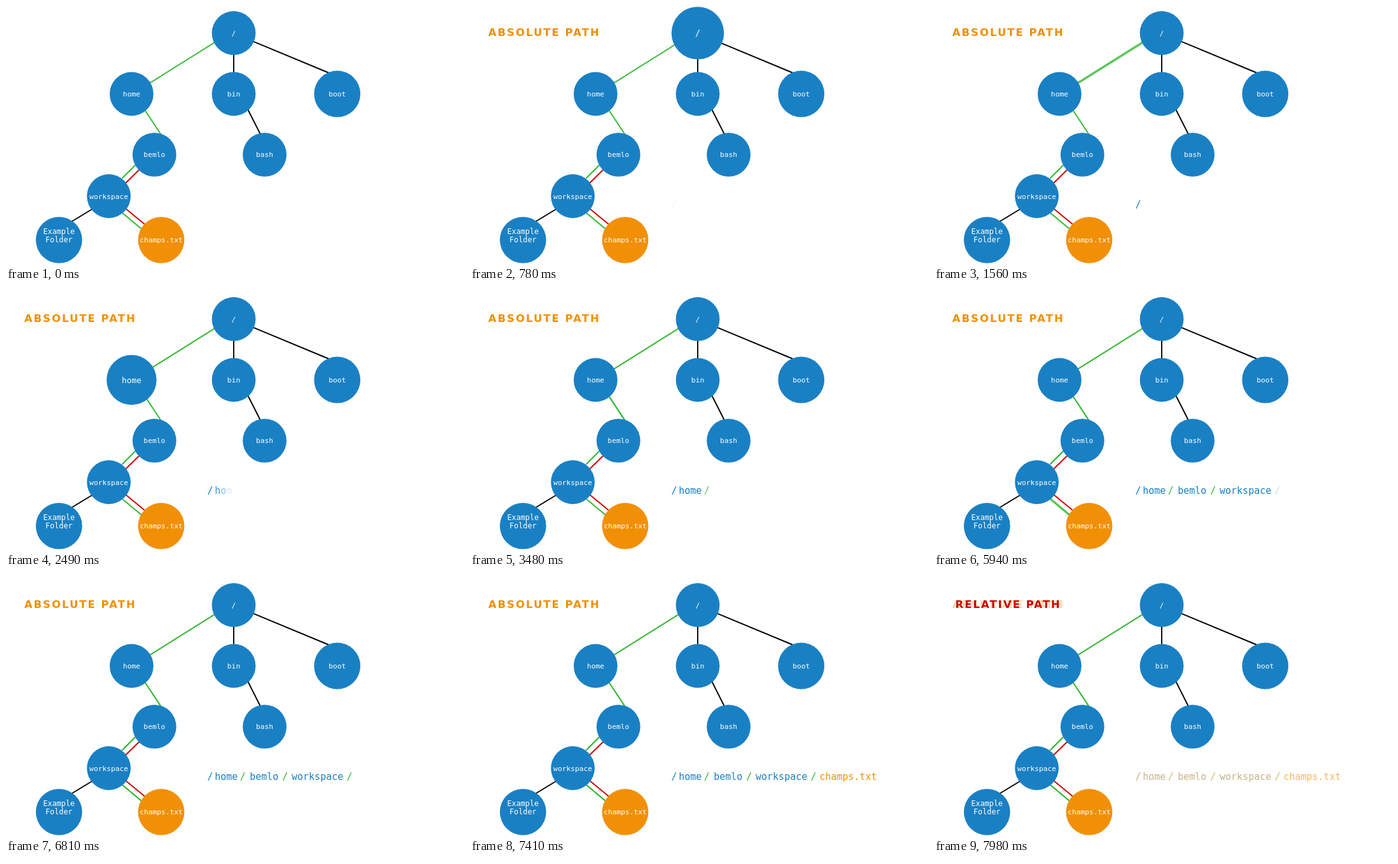
An HTML page with a canvas that plays this animation: 720 by 405 pixels, repeating every 8 s.

```html
<!DOCTYPE html>
<html lang="en">
<head>
<meta charset="utf-8">
<title>File paths</title>
<style>
  html, body { margin: 0; width: 100%; height: 100%; overflow: hidden; background: #fff; }
  canvas { display: block; width: 720px; height: 405px; }
</style>
</head>
<body>
<canvas id="stage" width="720" height="405"></canvas>
<script>
const ctx = document.getElementById('stage').getContext('2d');
const LOOP = 8000;
const BLUE = [26, 128, 196], ORANGE = [241, 144, 6], GREEN = [47, 182, 47], RED = [204, 0, 0];
const BLACK = [0, 0, 0], WHITE = [255, 255, 255];
const MONO = '"DejaVu Sans Mono", monospace';
const TITLE = 'bold 16.5px "DejaVu Sans", sans-serif';
const PITCH = 9.03;

const nodes = [
  { x: 358, y: 42.5, r: 34.4, label: ['/'], pulse: [375, 1185] },
  { x: 197.4, y: 138, r: 34.4, label: ['home'], pulse: [1975, 2730] },
  { x: 358, y: 138, r: 34.4, label: ['bin'] },
  { x: 520.7, y: 138, r: 36.4, label: ['boot'] },
  { x: 233.3, y: 233.4, r: 34.4, label: ['bemlo'], pulse: [3620, 4400] },
  { x: 406.6, y: 233.4, r: 34.4, label: ['bash'] },
  { x: 161.6, y: 298.5, r: 34.4, label: ['workspace'], pulse: [4740, 5290] },
  { x: 83.3, y: 367.3, r: 36.4, label: ['Example', 'Folder'], size: 11.8 },
  { x: 244, y: 367.3, r: 36.4, label: ['champs.txt'], color: ORANGE, pulse: [6120, 6800] }
];

const edges = [
  { from: [358, 76], to: [358, 105], color: BLACK },
  { from: [388, 55.3], to: [510, 106], color: BLACK },
  { from: [380, 162], to: [400, 201.5], color: BLACK },
  { from: [136, 318.5], to: [103, 338.5], color: BLACK },
  { from: [188, 278], to: [210, 256.5], color: RED },
  { from: [188, 318], to: [219, 343.5], color: RED },
  { from: [329, 56.5], to: [226, 121], color: GREEN, pulse: [1270, 1995] },
  { from: [218, 163], to: [243.5, 201.5], color: GREEN, pulse: [2780, 3650] },
  { from: [182.5, 270.5], to: [204.5, 248.5], color: GREEN, pulse: [4390, 4960] },
  { from: [182, 324], to: [213, 350], color: GREEN, pulse: [5400, 6240] }
];

const path = [
  { text: '/', x: 316.5, color: BLUE, show: [750, 1200] },
  { text: 'home', x: 328.2, color: BLUE, show: [2200, 2900] },
  { text: '/', x: 367.7, color: GREEN, show: [3060, 3600] },
  { text: 'bemlo', x: 383.2, color: BLUE, show: [3800, 4410] },
  { text: '/', x: 434.3, color: GREEN, show: [4400, 4960] },
  { text: 'workspace', x: 449, color: BLUE, show: [4860, 5400] },
  { text: '/', x: 535.6, color: GREEN, show: [5770, 6330] },
  { text: 'champs.txt', x: 549.4, color: ORANGE, show: [6915, 7380], pop: 0.08 }
];

const clamp = v => Math.max(0, Math.min(1, v));
const phase = (t, [a, b]) => clamp((t - a) / (b - a));
const bump = (t, span) => span ? Math.sin(Math.PI * phase(t, span)) ** 2 : 0;
const mix = (a, b, k) => a.map((v, i) => v + (b[i] - v) * k);
const rgba = (c, a = 1) => `rgba(${c.map(Math.round).join(',')},${a})`;

function drawEdge(e, t) {
  const p = bump(t, e.pulse);
  const stroke = (width, alpha) => {
    ctx.lineWidth = width;
    ctx.strokeStyle = rgba(e.color, alpha);
    ctx.beginPath();
    ctx.moveTo(...e.from);
    ctx.lineTo(...e.to);
    ctx.stroke();
  };
  if (p > 0) stroke(2 + 2.6 * p, 0.5);
  stroke(1.9, 1 - 0.25 * p);
}

function drawNode(n, t) {
  const scale = 1 + 0.2 * bump(t, n.pulse);
  ctx.save();
  ctx.translate(n.x, n.y);
  ctx.scale(scale, scale);
  ctx.fillStyle = rgba(n.color || BLUE);
  ctx.beginPath();
  ctx.arc(0, 0, n.r, 0, Math.PI * 2);
  ctx.fill();
  ctx.fillStyle = rgba(WHITE);
  ctx.font = `${n.size || 11.25}px ${MONO}`;
  ctx.textAlign = 'center';
  const top = n.label.length > 1 ? -9.3 : 4;
  n.label.forEach((s, i) => ctx.fillText(s, 0, top + i * 13.4));
  ctx.restore();
}

function drawPart(part, t) {
  const p = phase(t, part.show);
  if (p === 0) return;
  const tint = phase(t, [7400, 8280]);
  const fade = 1 - phase(t, [7680, 8540]);
  const n = part.text.length, tail = n > 1 ? 2 : 0;
  const half = n * PITCH / 2;
  const scale = 1 + (part.pop || 0) * bump(t, part.show);
  ctx.save();
  ctx.translate(part.x + half, 312);
  ctx.scale(scale, scale);
  ctx.font = `15px ${MONO}`;
  ctx.textAlign = 'left';
  const color = mix(part.color, ORANGE, tint);
  for (let i = 0; i < n; i++) {
    // letters fade in one after another
    const a = tail ? clamp((p * (n + tail) - i) / (tail + 1)) : p;
    ctx.fillStyle = rgba(color, a * fade);
    ctx.fillText(part.text[i], i * PITCH - half, 5);
  }
  ctx.restore();
}

function drawTitle(text, color, alpha) {
  if (alpha <= 0) return;
  ctx.save();
  ctx.font = TITLE;
  ctx.letterSpacing = '2px';
  ctx.textAlign = 'center';
  ctx.fillStyle = rgba(color, alpha);
  ctx.fillText(text, 116.7, 47);
  ctx.restore();
}

function draw(t) {
  ctx.fillStyle = '#fff';
  ctx.fillRect(0, 0, 720, 405);
  edges.forEach(e => drawEdge(e, t));
  nodes.forEach(n => drawNode(n, t));
  path.forEach(part => drawPart(part, t));
  drawTitle('ABSOLUTE PATH', ORANGE, phase(t, [340, 760]) * (1 - phase(t, [7680, 8140])));
  drawTitle('RELATIVE PATH', RED, phase(t, [7620, 7960]));
}

let start;
function tick(now) {
  start ??= now;
  draw((now - start) % LOOP);
  requestAnimationFrame(tick);
}
draw(0);
requestAnimationFrame(tick);
</script>
</body>
</html>
```
